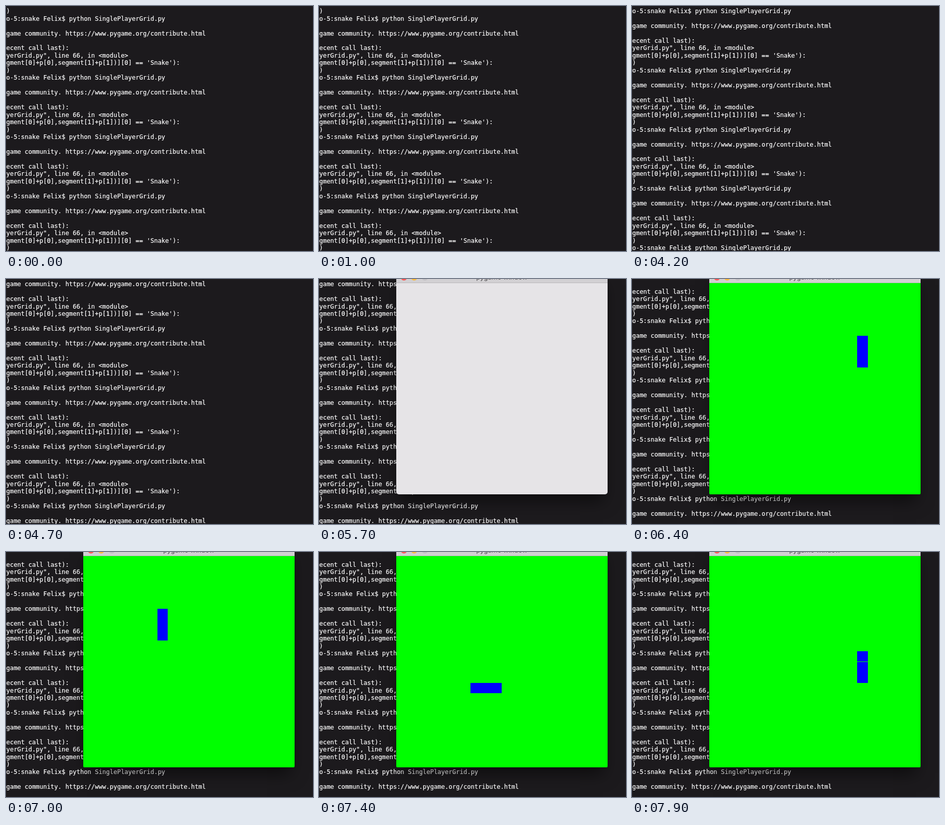
These frames come from a looping animation (600x479 px, 8000 ms). An HTML page:

```html
<!DOCTYPE html>
<html lang="en">
<head>
<meta charset="utf-8">
<title>Snake in the terminal</title>
<style>
  html, body { margin: 0; width: 100%; height: 100%; overflow: hidden; background: #1c1a1d; }
  #terminal { position: absolute; left: 0; top: 3.1px; width: 600px; height: 476px; overflow: hidden; }
  #output {
    position: absolute; left: -6.8px; top: 0; margin: 0; color: #fff;
    font: 12px/14.47px "DejaVu Sans Mono", monospace;
    -webkit-text-stroke: .2px #fff;
  }
  #window {
    position: absolute; left: 151px; top: -16px; width: 413px; height: 437px;
    border-radius: 5px; box-shadow: 0 20px 30px -8px rgba(0, 0, 0, .55);
  }
  #bar {
    height: 24px; box-sizing: border-box; border-bottom: 1px solid #b9b7ba;
    background: #d2d0d3; border-radius: 5px 5px 0 0;
    color: #454346; font: 13px/24px Inter, sans-serif; text-align: center;
  }
  #bar i { position: absolute; top: 7px; width: 12px; height: 12px; border-radius: 50%; }
  #board { position: relative; height: 413px; background: #e6e4e7; border-radius: 0 0 5px 5px; }
  #board.running { background: #0f0; border-radius: 0 0 2px 2px; }
  #board b { position: absolute; width: 5%; height: 5%; background: #00f; }
</style>
</head>
<body>
<div id="terminal"><pre id="output"></pre></div>
<div id="window">
  <div id="bar">
    <i style="left:8.5px;background:#fc5b57"></i>
    <i style="left:29px;background:#fdbc40"></i>
    <i style="left:50px;background:#c3c1c4"></i>
    pygame window
  </div>
  <div id="board"><b></b><b></b><b></b></div>
</div>
<script>
const LOOP = 8000, LINE = 14.47, GAME_START = 5800;
const $ = id => document.getElementById(id);

const session = [
  " )",
  "ro-5:snake Felix$ python SinglePlayerGrid.py",
  "",
  "ygame community. https://www.pygame.org/contribute.html",
  "",
  "recent call last):",
  ' yerGrid.py", line 66, in <module>',
  " gment[0]+p[0],segment[1]+p[1])][0] == 'Snake'):"
];
$("output").textContent =
  Array.from({ length: 36 }, (_, i) => session[i % session.length]).join("\n");

// Cells the snake's head passes through, as legs of [dx, dy, length].
const path = [[7, 10]];
for (const [dx, dy, length] of
     [[1, 0, 7], [0, -1, 5], [-1, 0, 7], [0, 1, 7], [1, 0, 7], [0, -1, 3]]) {
  for (let i = 0; i < length; i++) {
    const [x, y] = path[path.length - 1];
    path.push([x + dx, y + dy]);
  }
}
const segments = [...$("board").children];

function scrolledLines(t) {
  return t < 4200 ? 0 : t < 4700 ? 1 : t < GAME_START ? 3 : 4;
}

function render(t) {
  $("output").style.top = -scrolledLines(t) * LINE + "px";
  $("window").style.display = t < 5700 ? "none" : "block";

  const running = t >= GAME_START;
  $("board").classList.toggle("running", running);
  const tick = Math.floor((t - GAME_START) / 100);
  const moves = Math.floor(1.6 * tick + .6);
  segments.forEach((segment, i) => {
    segment.hidden = !running;
    segment.style.display = running ? "block" : "none";
    if (!running) return;
    const [x, y] = path[Math.min(moves + i, path.length - 1)];
    segment.style.left = x * 5 + "%";
    segment.style.top = y * 5 + "%";
  });
}

const start = performance.now();
function frame() {
  render((performance.now() - start) % LOOP);
  requestAnimationFrame(frame);
}
frame();
</script>
</body>
</html>
```
